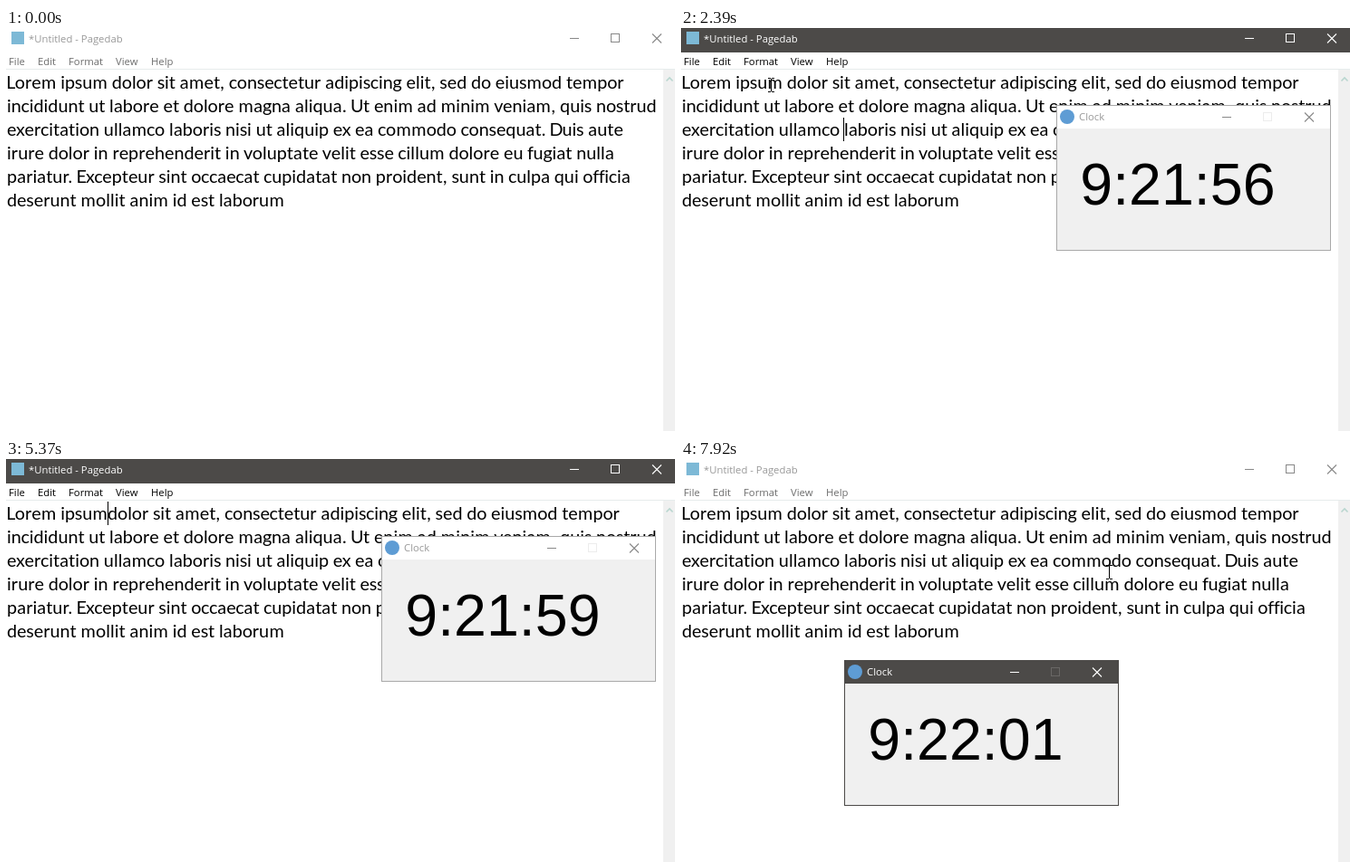
Recreate the animation shown at these times as an HTML page with a canvas. Size 738 by 445 pixels, loop 8 s.

```html
<!DOCTYPE html>
<html lang="en">
<head>
<meta charset="utf-8">
<title>Text editor and clock</title>
<style>
  html, body { margin: 0; width: 100%; height: 100%; overflow: hidden; background: #fff; }
  canvas { display: block; }
</style>
</head>
<body>
<canvas id="stage" width="738" height="445"></canvas>
<script>
const ctx = document.getElementById('stage').getContext('2d');
const LOOP = 8000, FRAME = 1000 / 13;
const DARK = '#4c4a48';
const UI_FONT = '11.3px "Open Sans", "Noto Sans", sans-serif';
const BODY_FONT = '19.8px Lato, sans-serif';
const DIGIT_FONT = '64.5px "Liberation Sans", Arial, sans-serif';

// Body text metrics: glyph advances and kerning in thousandths of an em.
const EM = 21, LINE = 26, LEFT = 1, TOP = 47, RIGHT = 722;
const ADVANCE = {
  a: 479, b: 525, c: 423, d: 525, e: 498, f: 305, g: 471, h: 525, i: 229, l: 229,
  m: 799, n: 525, o: 527, p: 525, q: 525, r: 349, s: 391, t: 335, u: 525, v: 452,
  x: 433, L: 420, U: 642, D: 615, E: 488, ' ': 226, ',': 250, '.': 252
};
const KERN = { 'r.': -75 };
const HEAD = 'Lorem ';
const TAIL = 'dolor sit amet, consectetur adipiscing elit, sed do eiusmod tempor ' +
  'incididunt ut labore et dolore magna aliqua. Ut enim ad minim veniam, quis nostrud ' +
  'exercitation ullamco laboris nisi ut aliquip ex ea commodo consequat. Duis aute ' +
  'irure dolor in reprehenderit in voluptate velit esse cillum dolore eu fugiat nulla ' +
  'pariatur. Excepteur sint occaecat cupidatat non proident, sunt in culpa qui officia ' +
  'deserunt mollit anim id est laborum';

// Timeline
const T = { open: 1160, focusEditor: 1920, select: 2480, cut: 3710, type: 4510, focusClock: 6840 };
const EDITS = [[0, 'ipsum '], [T.cut, ''], [T.type, 'i'], [4830, 'ip'], [5060, 'ips'],
  [5140, 'ipsu'], [5370, 'ipsum'], [5520, 'ipsum ']];
const CARET_ON = [[T.focusEditor, 2450], [T.select, 3010], [3540, 4280], [T.type, 6050], [6580, T.focusClock]];
const PRESSED = [[T.focusEditor, 2030], [2470, 2640], [T.focusClock, 7660]];
const POINTER_ON = [[1615, T.type], [5975, LOOP]];
const POINTER = [[1600, 300, 440], [1910, 182, 112], [2000, 182, 112], [2380, 99, 63],
  [2700, 99, 63], [3300, 398, 261], [5900, 392, 228], [6750, 497, 100], [6950, 497, 100],
  [7307, 467, 125], [7610, 263, 237], [7680, 263, 237], [7915, 472, 125]];
const DRAG_START = 6950, DRAG_END = 7610;
const CLOCK = { x: 414, y: 85, w: 303, h: 161 };

const within = (t, spans) => spans.some(([a, b]) => t >= a && t < b);
const lerp = (a, b, u) => a + (b - a) * u;
const smooth = u => u * u * (3 - 2 * u);
const advance = (c, next) => (ADVANCE[c] + (KERN[c + next] || 0)) * EM / 1000;
const textWidth = s => [...s].reduce((sum, c, i) => sum + advance(c, s[i + 1]), 0);

function rect(x, y, w, h, color) {
  ctx.fillStyle = color;
  ctx.fillRect(x, y, w, h);
}

function frame(x, y, w, h, color) {
  ctx.strokeStyle = color;
  ctx.lineWidth = 1;
  ctx.strokeRect(x + 0.5, y + 0.5, w - 1, h - 1);
}

function label(text, x, y, color, font = UI_FONT) {
  ctx.font = font;
  ctx.fillStyle = color;
  ctx.fillText(text, x, y);
}

function polyline(color, width, ...points) {
  ctx.strokeStyle = color;
  ctx.lineWidth = width;
  ctx.beginPath();
  points.forEach(([x, y]) => ctx.lineTo(x, y));
  ctx.stroke();
}

function disc(x, y, r, color) {
  ctx.fillStyle = color;
  ctx.beginPath();
  ctx.arc(x, y, r, 0, 7);
  ctx.fill();
}

// Minimise, maximise and close; x is the left end of the first.
function windowButtons(x, y, color, maxColor) {
  rect(x, y, 10, 1, color);
  frame(x + 45, y - 5, 10, 10, maxColor);
  polyline(color, 1.1, [x + 91, y - 4.5], [x + 101, y + 5.5]);
  polyline(color, 1.1, [x + 101, y - 4.5], [x + 91, y + 5.5]);
}

function wrap(text) {
  const lines = [];
  let line = '';
  for (const word of text.match(/\S+ ?/g)) {
    if (LEFT + textWidth((line + word).trimEnd()) > RIGHT) {
      lines.push(line);
      line = '';
    }
    line += word;
  }
  return [...lines, line];
}

function drawBody(t) {
  const typed = EDITS.filter(([at]) => t >= at).pop()[1];
  const selStart = HEAD.length;
  const selEnd = within(t, [[T.select, T.cut]]) ? selStart + typed.length : 0;
  const selX = Math.floor(LEFT + textWidth(HEAD));
  const typedX = Math.round(LEFT + textWidth(HEAD + typed));
  if (selEnd) rect(selX, TOP, typedX - selX, LINE, '#0078d7');

  ctx.font = BODY_FONT;
  let index = 0;
  wrap(HEAD + typed + TAIL).forEach((line, row) => {
    let x = LEFT;
    [...line].forEach((c, i) => {
      const bearing = (advance(c) - ctx.measureText(c).width) / 2;
      ctx.fillStyle = index >= selStart && index < selEnd ? '#fff' : '#000';
      ctx.fillText(c, x + bearing, TOP + 20 + row * LINE);
      x += advance(c, line[i + 1]);
      index++;
    });
  });

  if (within(t, CARET_ON)) {
    const early = t < T.select;
    const x = early ? LEFT + textWidth('exercitation ullamco ') : typedX;
    rect(Math.floor(x), early ? TOP + 2 * LINE : TOP, 1, LINE, '#000');
  }
}

function drawEditor(t) {
  const active = within(t, [[T.focusEditor, T.focusClock]]);
  rect(0, 0, 738, 445, '#fff');
  if (active) rect(0, 0, 738, 27, DARK);
  rect(6, 4, 14, 14, '#7db9d6');
  label('*Untitled - Pagedab', 25, 16, active ? '#fff' : '#999');
  const buttons = active ? '#fff' : '#888';
  windowButtons(622, 11, buttons, buttons);
  [['File', 3], ['Edit', 35], ['Format', 69], ['View', 121], ['Help', 160]]
    .forEach(([text, x]) => label(text, x, 41, active ? '#000' : '#6d6d6d'));
  rect(0, 45, 738, 1, '#e6ecec');
  rect(725, 46, 13, 399, '#f0f0f0');
  polyline('#b9d6cf', 1.6, [728.5, 58.5], [732, 55], [735.5, 58.5]);
  drawBody(t);
}

function clockTime(t) {
  const s = 9 * 3600 + 21 * 60 + 55 + Math.floor((t - 1240) / 974);
  const pad = n => String(n).padStart(2, '0');
  return `${Math.floor(s / 3600)}:${pad(Math.floor(s / 60) % 60)}:${pad(s % 60)}`;
}

// The window fades in over its own opaque copy of the backdrop colour.
function drawClock(t, pos) {
  if (t < T.open) return;
  const active = t < T.focusEditor || t >= T.focusClock;
  const { w, h } = CLOCK;
  const k = Math.min(1, Math.floor((t - T.open) / 80) / 2);
  const u = 1 - (1 - k) ** 2;
  const scale = lerp(0.878, 1, u);
  const alpha = lerp(0.39, 1, u);
  const fade = (r, g = r, b = r) =>
    `rgb(${[r, g, b].map(v => Math.round(lerp(255, v, alpha))).join(',')})`;
  const white = fade(255), dark = fade(76, 74, 72), gray = fade(136);

  ctx.save();
  ctx.translate(lerp(604, pos.x + w / 2, u), lerp(279.5, pos.y + h / 2, u));
  ctx.scale(scale, scale);
  ctx.translate(-w / 2, -h / 2);
  rect(0, 0, w, 26, active ? dark : white);
  rect(0, 26, w, h - 26, fade(240));
  frame(0, 0, w, h, active ? dark : fade(169));
  disc(12, 13, 8, fade(94, 156, 212));
  label('Clock', 25, 17, active ? white : fade(153));
  windowButtons(183, 13, active ? white : gray, active ? fade(105, 103, 101) : fade(236));
  label(clockTime(t), 26.3, 110, fade(0), DIGIT_FONT);
  ctx.restore();
}

function pointerAt(t) {
  const i = POINTER.findIndex(([at]) => at > t);
  if (i < 1) {
    const [, x, y] = i ? POINTER[POINTER.length - 1] : POINTER[0];
    return { x, y };
  }
  const [t0, x0, y0] = POINTER[i - 1], [t1, x1, y1] = POINTER[i];
  const v = (t - t0) / (t1 - t0);
  const u = t > DRAG_START && t < DRAG_END ? v : smooth(v);
  return { x: Math.round(lerp(x0, x1, u)), y: Math.round(lerp(y0, y1, u)) };
}

function clockPosition(t, pointer) {
  if (t < DRAG_START) return CLOCK;
  return t < DRAG_END ? { x: pointer.x - 83, y: pointer.y - 15 } : { x: 180, y: 222 };
}

function drawArrow(x, y) {
  ctx.beginPath();
  [[0, 0], [0, 16], [4, 12.5], [6.5, 18], [9, 17], [6.5, 11.5], [11.5, 11.5]]
    .forEach(([dx, dy]) => ctx.lineTo(x + 0.5 + dx, y + 0.5 + dy));
  ctx.closePath();
  ctx.fillStyle = '#fff';
  ctx.fill();
  ctx.strokeStyle = '#000';
  ctx.lineWidth = 1;
  ctx.stroke();
}

function drawIBeam(x, y) {
  rect(x, y - 7, 1, 14, '#000');
  for (const dy of [-8, 7]) {
    rect(x - 3, y + dy, 3, 1, '#000');
    rect(x + 1, y + dy, 3, 1, '#000');
  }
}

function drawPointer(t, { x, y }, pos) {
  if (!within(t, POINTER_ON)) return;
  if (within(t, PRESSED)) disc(x, y, 12, 'rgba(255, 245, 0, 0.5)');
  const overClock = x >= pos.x && x < pos.x + CLOCK.w && y >= pos.y && y < pos.y + CLOCK.h;
  if (overClock) drawArrow(x, y);
  else drawIBeam(x, y);
}

function draw(t) {
  const stepped = Math.floor((t + 10) / FRAME) * FRAME;
  const pointer = pointerAt(stepped);
  const pos = clockPosition(stepped, pointer);
  drawEditor(t);
  drawClock(t, pos);
  drawPointer(t, pointer, pos);
}

const start = performance.now();
function tick() {
  draw((performance.now() - start) % LOOP);
  requestAnimationFrame(tick);
}
tick();
</script>
</body>
</html>
```
